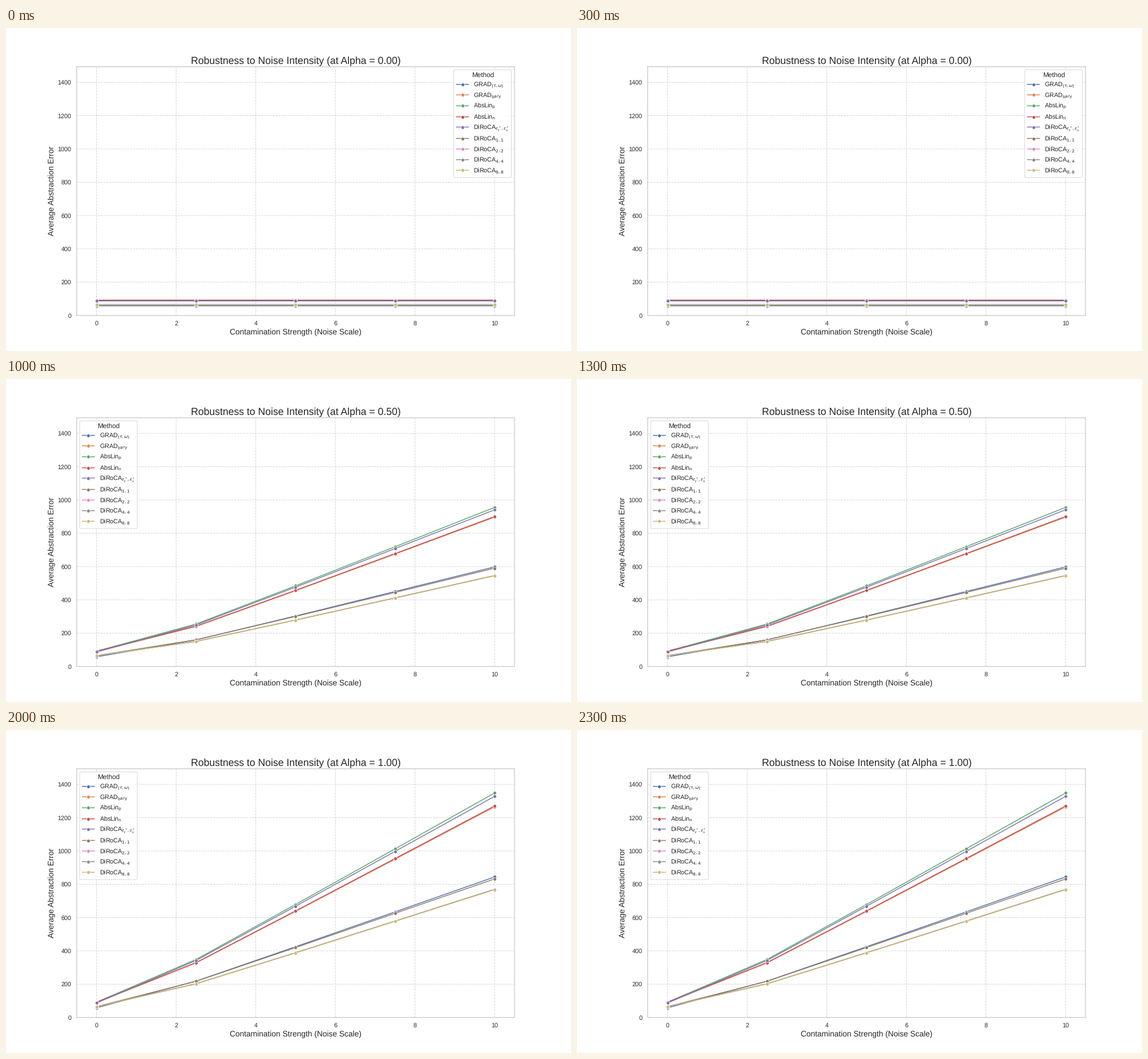
Write a matplotlib script that moves like this. It is 990 px wide and 566 px high and loops after 2500 ms.

```python
import numpy as np
import matplotlib.pyplot as plt
from matplotlib.animation import FuncAnimation

W, H = 990, 566
DPI = W / 14
EPS = 1e-6  # keeps the pixel size from being truncated downwards
INK, RULE = "0.15", "0.8"

plt.rcParams.update({
    "font.family": "Liberation Sans",
    "text.hinting": "none",
    "path.snap": False,
    "text.color": INK,
    "axes.labelcolor": INK,
    "axes.edgecolor": RULE,
    "axes.linewidth": 1.4,
    "axes.axisbelow": True,
    "axes.titlesize": 18,
    "axes.labelsize": 14,
    "xtick.color": INK,
    "ytick.color": INK,
    "xtick.labelsize": 11,
    "ytick.labelsize": 11,
    "xtick.major.size": 6,
    "ytick.major.size": 6,
    "xtick.bottom": False,
    "ytick.left": False,
    "grid.color": RULE,
    "grid.linestyle": "--",
    "grid.linewidth": 1,
    "grid.alpha": 0.85,
    "legend.fontsize": 11,
    "legend.title_fontsize": 12,
    "legend.labelspacing": 0.38,
    "lines.linewidth": 1.5,
    "lines.markersize": 6,
    "lines.solid_capstyle": "round",
})

# label, colour, error without noise, growth per unit of noise
METHODS = [
    (r"GRAD$_{(\tau, \omega)}$", "#4c72b0", 58, 84.2),
    (r"GRAD$_{\mathrm{bary}}$", "#dd8452", 89, 126.2),
    (r"AbsLin$_{\mathrm{p}}$", "#55a868", 92, 134.5),
    (r"AbsLin$_{\mathrm{n}}$", "#c44e52", 92, 126.7),
    (r"DiRoCA$_{\varepsilon_\ell^*, \varepsilon_n^*}$", "#8172b3", 87, 132.5),
    (r"DiRoCA$_{1,1}$", "#937860", 65, 82.95),
    (r"DiRoCA$_{2,2}$", "#da8bc3", 65, 76.6),
    (r"DiRoCA$_{4,4}$", "#8c8c8c", 66, 76.7),
    (r"DiRoCA$_{8,8}$", "#ccb974", 65, 76.5),
]
SCALES = np.linspace(0, 10, 5)
ALPHAS = np.linspace(0, 1, 5)

fig, ax = plt.subplots(figsize=((W + EPS) / DPI, (H + EPS) / DPI), dpi=DPI)
fig.subplots_adjust(left=0.125, right=0.9, bottom=0.11, top=0.88)
ax.set(xlim=(-0.5, 10.5), ylim=(0, 1493.7),
       xlabel="Contamination Strength (Noise Scale)",
       ylabel="Average Abstraction Error")
ax.grid(True)

title = ax.set_title("")
lines = [ax.plot(SCALES, 0 * SCALES, color=color, label=label, marker="o",
                 markeredgecolor="white", markeredgewidth=0.75)[0]
         for label, color, _, _ in METHODS]
legend = ax.legend(title="Method", loc="upper right")


def draw(i):
    alpha = ALPHAS[i]
    noise = SCALES * np.sqrt(alpha)
    for line, (_, _, base, growth) in zip(lines, METHODS):
        line.set_ydata(np.hypot(base, growth * noise))
    title.set_text(f"Robustness to Noise Intensity (at Alpha = {alpha:.2f})")
    legend.set_loc("upper right" if alpha < 0.5 else "upper left")
    return [*lines, title, legend]


anim = FuncAnimation(fig, draw, frames=len(ALPHAS), interval=500,
                     repeat=True, repeat_delay=0)
plt.show()
```
